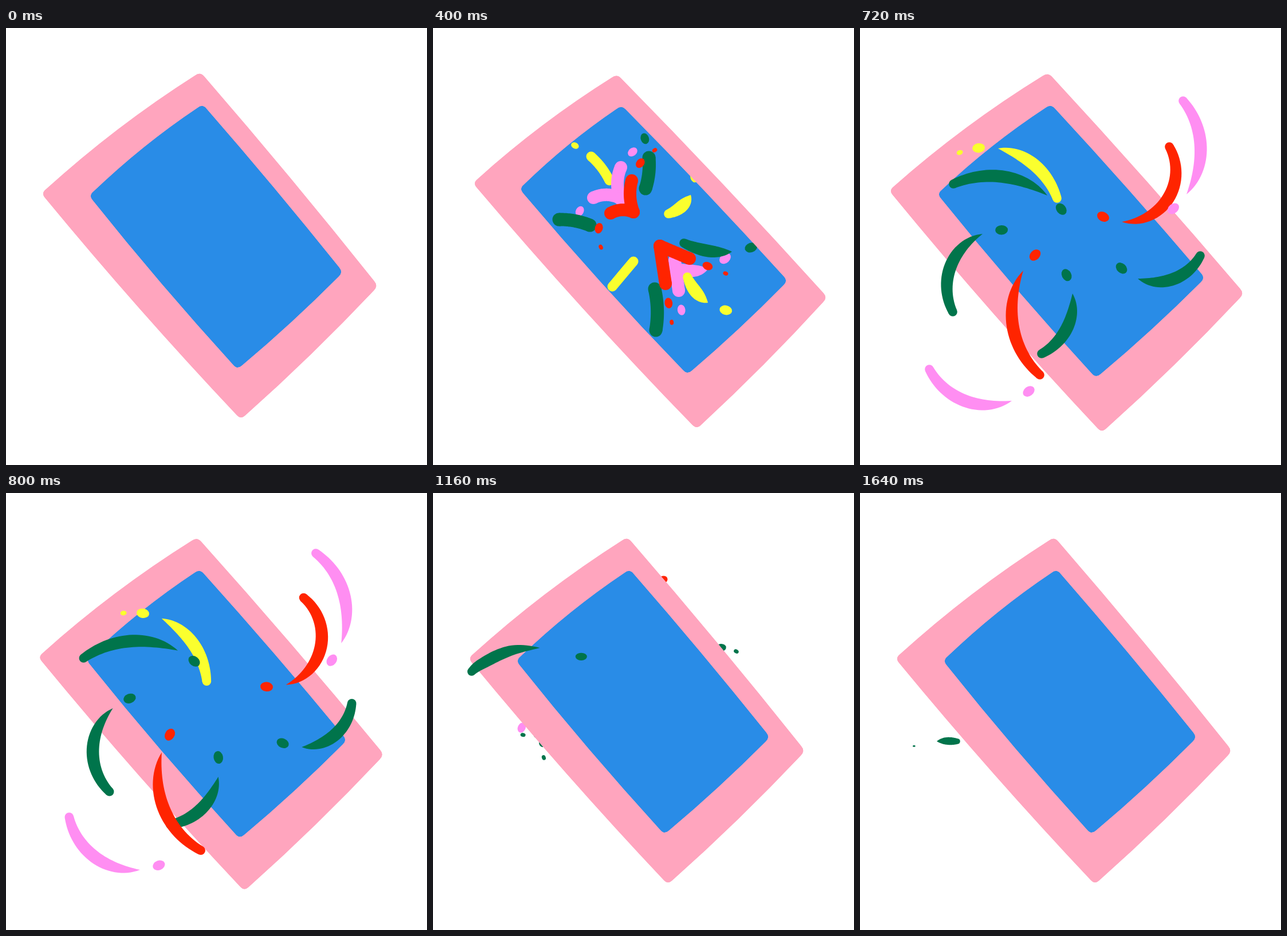
Write an HTML page with a canvas that moves like this. It is 735x762 px and loops after 1680 ms.

```html
<!DOCTYPE html>
<html lang="en">
<head>
<meta charset="utf-8">
<style>
  html, body { margin: 0; width: 100%; height: 100%; overflow: hidden; background: #fff; }
  canvas { display: block; }
</style>
</head>
<body>
<canvas id="stage" width="735" height="762"></canvas>
<script>
const ctx = document.getElementById('stage').getContext('2d');
const FRAME = '#ffa5be', SCREEN = '#298ce7';
const YELLOW = { fill: '#faff2e', width: 17 }, PINK = { fill: '#ff8ef2', width: 22 },
      GREEN = { fill: '#00744b', width: 23 }, RED = { fill: '#ff2400', width: 22 };
const LOOP = 1680, CENTRE = [372, 354], SPEED = .4, DROP_GAP = 34;
const lerp = (a, b, k) => a + (b - a) * k;
const clamp = (v, lo, hi) => Math.min(hi, Math.max(lo, v));
let advance = 0; // how far ribbons have travelled along their arcs, in pixels

function ellipse([x, y], rx, ry = rx, angle = 0) {
  ctx.beginPath();
  ctx.ellipse(x, y, rx, ry, angle, 0, Math.PI * 2);
  ctx.fill();
}

// Fills a band around a curve; half(t) is its half width from head (0) to tail (1).
function band(point, half, steps = 32) {
  const left = [], right = [];
  for (let i = 0; i <= steps; i++) {
    const t = i / steps, [x, y] = point(t);
    const [ax, ay] = point(t - .005), [bx, by] = point(t + .005);
    const k = half(t) / (Math.hypot(bx - ax, by - ay) || 1);
    const nx = (by - ay) * k, ny = (ax - bx) * k;
    left.push([x - nx, y - ny]);
    right.unshift([x + nx, y + ny]);
  }
  ctx.beginPath();
  [...left, ...right].forEach(p => ctx.lineTo(...p));
  ctx.fill();
  ellipse(point(0), half(0));
  ellipse(point(1), half(1));
}

const pointed = size => t => size * (.6 + .7 * t) * (1 - t ** 3);

// Circular arc through two points; bend is its height relative to the chord.
function arc(hx, hy, tx, ty, bend) {
  const b = bend || .001, dx = tx - hx, dy = ty - hy;
  const turn = 4 * Math.atan(2 * b), chord = Math.hypot(dx, dy);
  const radius = chord / (2 * Math.sin(turn / 2)), offset = b - radius / chord;
  const cx = (hx + tx) / 2 - dy * offset, cy = (hy + ty) / 2 + dx * offset;
  const start = Math.atan2(hy - cy, hx - cx), reach = Math.hypot(hx - cx, hy - cy);
  const angle = u => start - turn * u;
  return {
    length: Math.abs(radius * turn), angle,
    at: u => [cx + reach * Math.cos(angle(u)), cy + reach * Math.sin(angle(u))]
  };
}

// Draws the drops that follow the tail of an arc.
function trail(path, shift, count, size) {
  for (let i = 1; i <= count; i++) {
    const u = 1 + DROP_GAP * i / path.length - shift;
    ellipse(path.at(u), size * .75 / i, size / i, path.angle(u));
  }
}

function ribbon(colour, hx, hy, tx, ty, bend = 0, drops = 0) {
  const path = arc(hx, hy, tx, ty, bend), shift = advance / path.length;
  ctx.fillStyle = colour.fill;
  band(t => path.at(t - shift), pointed(Math.min(13, 3 + path.length * .2)));
  trail(path, shift, drops, 11);
}

function petal(colour, hx, hy, tx, ty, bend = 0, drops = 0) {
  const path = arc(hx, hy, tx, ty, bend);
  ctx.fillStyle = colour.fill;
  band(path.at, () => colour.width / 2);
  trail(path, 0, drops, colour.width / 2.4);
}

function bloom() {
  petal(YELLOW, 308, 266, 276, 224, .05, 1);
  petal(YELLOW, 350, 407, 313, 451);
  ribbon(YELLOW, 411, 324, 450, 291, .1, 1);
  petal(PINK, 327, 298, 328, 243, -.1, 1);
  petal(PINK, 327, 297, 280, 296, .12, 1);
  petal(PINK, 422, 405, 429, 458, 0, 1);
  ribbon(PINK, 418, 415, 481, 419, .1, 1);
  petal(GREEN, 371, 280, 377, 226, .05, 1);
  petal(GREEN, 274, 344, 220, 334, .05, 1);
  petal(GREEN, 387, 455, 389, 527, -.05, 1);
  ribbon(GREEN, 438, 375, 522, 390, .07, 1);
  petal(RED, 350, 321, 347, 266, -.08, 2);
  petal(RED, 350, 321, 310, 323, .12, 2);
  petal(RED, 396, 380, 406, 446, 0, 2);
  petal(RED, 396, 380, 448, 402, 0, 2);
  ribbon(YELLOW, 444, 434, 480, 479, .08, 1);
}

function burst() {
  petal(YELLOW, 372, 312, 354, 267, .1);
  petal(YELLOW, 410, 330, 434, 268, -.12);
  petal(YELLOW, 328, 365, 308, 412, -.1);
  ribbon(YELLOW, 310, 378, 262, 360);
  ribbon(YELLOW, 349, 409, 331, 434);
  ribbon(YELLOW, 360, 380, 352, 352);
  ribbon(YELLOW, 320, 290, 316, 275);
  ribbon(YELLOW, 422, 402, 416, 389);
  ribbon(PINK, 512, 335, 412, 356, -.15);
  petal(PINK, 402, 428, 346, 543, -.17);
  ribbon(GREEN, 360, 345, 293, 331, .15, 1);
  ribbon(GREEN, 385, 362, 459, 375, .12, 1);
  petal(GREEN, 384, 345, 373, 289, -.1, 1);
  petal(GREEN, 375, 350, 385, 406);
  ribbon(RED, 345, 308, 455, 337, .19);
  petal(RED, 361, 354, 285, 392, .17);
  petal(RED, 393, 362, 402, 368);
  petal(RED, 342, 266, 342, 279);
}

function flight() {
  ribbon(YELLOW, 344, 297, 241, 210, .14, 2);
  ribbon(GREEN, 163, 272, 327, 292, -.14, 1);
  ribbon(GREEN, 162, 495, 214, 359, -.22, 1);
  ribbon(GREEN, 317, 568, 371, 463, .16, 1);
  ribbon(GREEN, 594, 397, 485, 437, -.19, 1);
  ribbon(RED, 540, 207, 457, 338, -.3, 1);
  ribbon(RED, 314, 605, 285, 423, -.18, 1);
  ribbon(PINK, 121, 595, 265, 650, .19, 1);
  ribbon(PINK, 564, 127, 570, 290, -.17, 1);
}

function orbit() {
  ribbon(PINK, 335, 120, 419, 87, -.15, 1);
  ribbon(PINK, 165, 368, 97, 466, .16, 1);
  ribbon(RED, 375, 165, 452, 105, -.28, 1);
  ribbon(RED, 565, 505, 540, 630, -.16, 1);
  ribbon(GREEN, 478, 300, 574, 266, -.3, 2);
  ribbon(GREEN, 185, 385, 98, 433, -.25, 2);
  ribbon(GREEN, 195, 410, 159, 496, .26, 2);
  ribbon(YELLOW, 197, 130, 178, 125);
  ribbon(YELLOW, 598, 328, 597, 307);
  ribbon(YELLOW, 184, 463, 176, 450);
}

const streamer = () => ribbon(YELLOW, 256, 611, 391, 535, .2, 2);

// Each scene grows towards its peak and shrinks after it, by a rate per ms.
const scenes = [
  { start: 240, peak: 400, end: 560, rise: 1 / 240, fade: 1 / 400, inside: bloom },
  { start: 560, peak: 600, end: 640, rise: 1 / 260, fade: 0, inside: burst },
  { start: 640, peak: 720, end: 880, rise: 1 / 320, fade: 0, over: flight },
  { start: 880, peak: 960, end: 1320, rise: 0, fade: 1 / 1100, under: orbit },
  { start: 880, peak: 960, end: 1160, rise: 0, fade: 0, over: streamer }
];

function drawScenes(layer, time) {
  for (const s of scenes) {
    if (!s[layer] || time < s.start || time >= s.end) continue;
    const age = time - s.peak;
    const scale = 1 + Math.min(0, age) * s.rise - Math.max(0, age) * s.fade;
    advance = age * SPEED;
    ctx.save();
    ctx.translate(...CENTRE);
    ctx.scale(scale, scale);
    ctx.translate(-CENTRE[0], -CENTRE[1]);
    s[layer]();
    ctx.restore();
  }
}

// Corners of frame and screen, clockwise from the top, with the time of each tilt.
const rest = [[339,76, 650,450, 410,683, 61,288], [343,132, 589,426, 404,596, 144,292]];
const tilts = [
  [240, rest],
  [400, [[321,80, 689,470, 460,700, 69,270], [329,134, 620,441, 444,605, 150,280]]],
  [600, [[222,57, 718,523, 551,685, 34,188], [248,110, 639,473, 506,591, 115,213]]],
  [720, [[328,77, 671,463, 422,706, 50,283], [333,132, 603,436, 412,611, 134,289]]],
  [880, rest]
];
const BOWS = [.005, .01, .008, .02];

function cornersAt(time) {
  const next = tilts.findIndex(([t]) => t > time);
  if (next < 1) return rest;
  const [t0, from] = tilts[next - 1], [t1, to] = tilts[next];
  return from.map((ring, r) => ring.map((v, i) => lerp(v, to[r][i], (time - t0) / (t1 - t0))));
}

// A quadrilateral with slightly bowed sides and rounded corners.
function ringPath(corners, radius = 11) {
  const path = new Path2D();
  for (let i = 0; i < 4; i++) {
    const x = corners[2 * i], y = corners[2 * i + 1];
    const dx = corners[(2 * i + 2) % 8] - x, dy = corners[(2 * i + 3) % 8] - y;
    const cut = radius / Math.hypot(dx, dy), bow = 2 * BOWS[i];
    const start = [x + dx * cut, y + dy * cut];
    if (i) path.quadraticCurveTo(x, y, ...start);
    else path.moveTo(...start);
    path.quadraticCurveTo(x + dx / 2 + dy * bow, y + dy / 2 - dx * bow,
                          x + dx * (1 - cut), y + dy * (1 - cut));
  }
  const first = Math.hypot(corners[2] - corners[0], corners[3] - corners[1]);
  path.quadraticCurveTo(corners[0], corners[1],
    lerp(corners[0], corners[2], radius / first), lerp(corners[1], corners[3], radius / first));
  path.closePath();
  return path;
}

function drawPhone(time) {
  const [outer, inner] = cornersAt(time).map(c => ringPath(c));
  ctx.fillStyle = FRAME;
  ctx.fill(outer);
  ctx.fillStyle = SCREEN;
  ctx.fill(inner);
  drawScenes('inside', time);
  outer.addPath(inner);
  ctx.fillStyle = FRAME;
  ctx.fill(outer, 'evenodd');
}

// The last leaf glides along this spline and shrinks as it slows down.
const leafPath = [[270,517],[315,487],[341,405],[317,327],[240,278],[150,272],[85,298],
  [58,324],[35,368],[46,418],[85,441],[134,433],[170,433]];

function leafPoint(u) {
  const last = leafPath.length - 1, i = clamp(Math.floor(u), 0, last - 1), k = u - i;
  const [p, q, r, s] = [-1, 0, 1, 2].map(j => leafPath[clamp(i + j, 0, last)]);
  return [0, 1].map(n => q[n] + k / 2 * (r[n] - p[n] +
    k * (2 * p[n] - 5 * q[n] + 4 * r[n] - s[n] + k * (3 * (q[n] - r[n]) + s[n] - p[n]))));
}

function drawLeaf(time) {
  if (time < 960) return;
  const p = (time - 960) / 680;
  const head = 3 + 9 * (1 - (1 - p) ** 1.45), tail = head - lerp(2.4, 1, p);
  const drop = lerp(11, 2, p);
  ctx.fillStyle = GREEN.fill;
  band(t => leafPoint(lerp(head, tail, t)), pointed(lerp(14, 8, p)));
  ellipse(leafPoint(Math.max(0, tail - .8)), drop * 1.2, drop * .8);
}

// Drawings are held for 80 ms, with a few exceptions in the rhythm.
function held(time) {
  const step = t => Math.floor(t / 80) * 80;
  if (time >= 1080) return step(time - 40) + 40;
  if (time >= 960) return 960;
  return time >= 600 && time < 640 ? 600 : step(time);
}

function draw() {
  const time = held(performance.now() % LOOP);
  ctx.fillStyle = '#fff';
  ctx.fillRect(0, 0, 735, 762);
  drawScenes('under', time);
  drawPhone(time);
  drawScenes('over', time);
  drawLeaf(time);
  requestAnimationFrame(draw);
}
draw();
</script>
</body>
</html>
```
